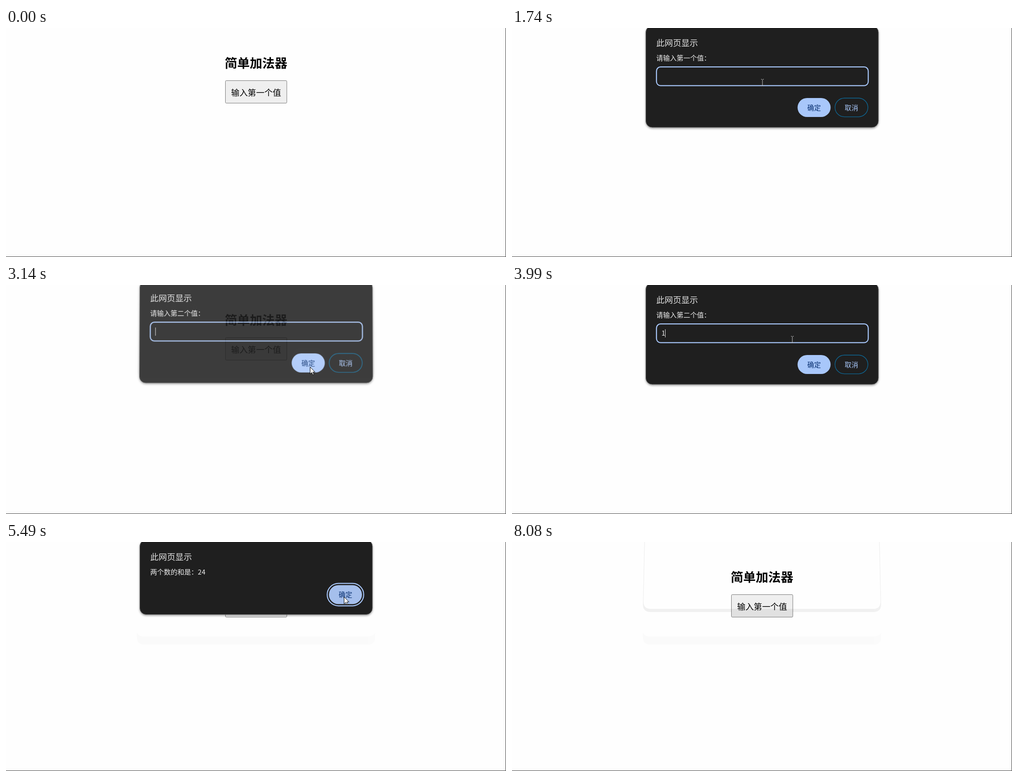
Animation of 1104x507 px, one loop 8150 ms. Source, as an HTML page:

```html
<!DOCTYPE html>
<html lang="zh-CN">
<head>
<meta charset="utf-8">
<title>简单加法器</title>
<style>
html, body { margin: 0; width: 100%; height: 100%; overflow: hidden; background: #fefefe; }
#stage { position: relative; width: 100%; height: 100%; overflow: clip; contain: strict; }
.layer { position: absolute; left: 0; top: 0; width: 100%; height: 100%; overflow: hidden; }
svg { display: block; width: 1104px; height: 507px; }
text { font-family: "Noto Sans CJK SC", "Noto Sans CJK JP", "Noto Sans CJK", sans-serif; font-size: 15px; }

/* every animation shares one 8150 ms cycle */
.dialog, .anim { animation: 8150ms linear infinite; }
.step { animation: 8150ms step-end infinite; }

.title { font-size: 27.6px; font-weight: 700; }
.label { font-size: 18.4px; }
.head { font-size: 18.4px; fill: #e3e3e3; }
.body { fill: #eee; }
.panel { fill: #1f1f1f; stroke: #6a6a6a; filter: drop-shadow(0 2px 2px rgba(0, 0, 0, .4)); }
.ok { fill: #a8c7fa; }
.oktext { fill: #062e6f; }
.cancel { fill: none; stroke: #0d6795; stroke-width: 1.4; }
.canceltext { fill: #a8c7fa; }
.field { fill: none; stroke: #a8c7fa; stroke-width: 2.3; }
.caret { fill: #e3e3e3; }
.dialog { height: 240px; transform-origin: 552px 0; opacity: 0; }
.dialog svg { height: 240px; }

#button { animation-name: hover; }
@keyframes hover {
  0% { fill: #efefef; }
  8.589% { fill: #e5e5e5; }
  14.356%, 100% { fill: #efefef; }
}

#first { animation-name: first; }
@keyframes first {
  0%, 11.534% { opacity: 0; transform: perspective(1000px) translateY(-14px) rotateX(1.2deg); animation-timing-function: ease-out; }
  14.356%, 37.546% { opacity: 1; transform: perspective(1000px) translateY(0) rotateX(0deg); }
  38.037% { opacity: .85; transform: perspective(1000px) translateY(-10.7px) rotateX(3deg); }
  38.57%, 100% { opacity: 0; transform: perspective(1000px) translateY(-18px) rotateX(5deg); }
}
#second { animation-name: second; }
@keyframes second {
  0%, 37.669% { opacity: 0; transform: perspective(1000px) translateY(-14px) rotateX(1.2deg); }
  38.528% { opacity: .865; transform: perspective(1000px) translateY(-4px) rotateX(1deg); }
  39.264%, 56.933% { opacity: 1; transform: perspective(1000px) translateY(0) rotateX(0deg); }
  57.546% { opacity: .92; transform: perspective(1000px) translateY(-10.7px) rotateX(3deg); }
  58.405%, 100% { opacity: 0; transform: perspective(1000px) translateY(-18px) rotateX(5deg); }
}
#sum { animation-name: sum; }
@keyframes sum {
  0%, 57.301% { opacity: 0; transform: perspective(1000px) translateY(-14px) rotateX(0deg); }
  57.546% { opacity: .19; transform: perspective(1000px) translateY(-12.5px) rotateX(0deg); animation-timing-function: ease-out; }
  59.141%, 75.46% { opacity: 1; transform: perspective(1000px) translateY(0) rotateX(0deg); }
  76.074% { opacity: .85; transform: perspective(1000px) translateY(-6px) rotateX(4deg); }
  76.56%, 100% { opacity: 0; transform: perspective(1000px) translateY(-10px) rotateX(8deg); }
}

#first .field { animation-name: blur1; }
@keyframes blur1 { 37.546%, 100% { stroke: #7c7e80; stroke-width: 1.2px; } }
#second .field { animation-name: blur2; }
@keyframes blur2 { 56.933%, 100% { stroke: #7c7e80; stroke-width: 1.2px; } }

/* typed digits */
.digit { fill-opacity: 0; }
#first .one { animation-name: type1; }
#first .two { animation-name: type2; }
#second .one { animation-name: type3; }
#second .two { animation-name: type4; }
@keyframes type1 { 25.153%, 100% { fill-opacity: 1; } }
@keyframes type2 { 26.994%, 100% { fill-opacity: 1; } }
@keyframes type3 { 48.957%, 100% { fill-opacity: 1; } }
@keyframes type4 { 50.552%, 100% { fill-opacity: 1; } }

#first .caret { animation-name: caret1; }
@keyframes caret1 {
  0% { opacity: 1; transform: translateX(0); }
  18.405% { opacity: 0; transform: translateX(0); }
  24.54% { opacity: 1; transform: translateX(0); }
  25.153% { opacity: 1; transform: translateX(8px); }
  26.994% { opacity: 1; transform: translateX(17px); }
  33.129%, 100% { opacity: 0; transform: translateX(17px); }
}
#second .caret { animation-name: caret2; }
@keyframes caret2 {
  0% { opacity: 1; transform: translateX(0); }
  43.558% { opacity: 0; transform: translateX(0); }
  48.957% { opacity: 1; transform: translateX(8px); }
  50.552% { opacity: 1; transform: translateX(17px); }
  56.687%, 100% { opacity: 0; transform: translateX(17px); }
}

#sum .ok { animation-name: okhover; }
@keyframes okhover { 66%, 100% { fill: #a5bfec; } }

/* faint marks left behind by closed dialogs */
.ghost { opacity: 0; fill-rule: evenodd; }
.low { animation-name: low; }
@keyframes low { 59.141%, 100% { opacity: .012; } }
.flash { animation-name: flash; }
@keyframes flash { 76.442% { opacity: .051; } 77.301%, 100% { opacity: 0; } }
.rim { animation-name: rim; }
@keyframes rim { 77.301%, 100% { opacity: .051; } }

#pointer { animation-name: travel; animation-timing-function: ease-in-out; }
@keyframes travel {
  0%, 3.313% { transform: translate(575px, 421px); }
  9.571%, 17.791% { transform: translate(553px, 152px); }
  19.632%, 28.834% { transform: translate(553px, 120px); }
  33.374%, 40.491% { transform: translate(671px, 181px); }
  43.558%, 51.534% { transform: translate(619px, 120px); }
  54.601%, 62.822% { transform: translate(680px, 184px); }
  67.362%, 77.914% { transform: translate(746px, 121px); }
  84.908%, 85.521% { transform: translate(958px, 489px); }
  87.607%, 100% { transform: translate(968px, 508px); }
}
#pointer path { opacity: 0; }
.arrow { animation-name: arrow; }
@keyframes arrow {
  3.313% { opacity: 1; }
  19.018% { opacity: 0; }
  29.448% { opacity: 1; }
  31.656% { opacity: 0; }
  37.546% { opacity: 1; }
  42.577% { opacity: 0; }
  52.025% { opacity: 1; }
  53.374% { opacity: 0; }
  62.822% { opacity: 1; }
  87.607%, 100% { opacity: 0; }
}
.beam { animation-name: beam; }
@keyframes beam {
  19.018% { opacity: 1; }
  29.448% { opacity: 0; }
  42.577% { opacity: 1; }
  52.025%, 100% { opacity: 0; }
}
.hand { animation-name: hand; }
@keyframes hand {
  31.656% { opacity: 1; }
  37.546% { opacity: 0; }
  53.374% { opacity: 1; }
  62.822%, 100% { opacity: 0; }
}
</style>
</head>
<body>
<div id="stage">
  <div class="layer">
    <svg>
      <defs>
        <g id="prompt">
          <rect class="panel" x="295.5" y="-4.5" width="513.5" height="224.5" rx="14"/>
          <text class="head" x="318.6" y="40">此网页显示</text>
          <rect class="ok" x="630.5" y="155" width="73" height="42" rx="21"/>
          <text class="oktext" x="652" y="181.6">确定</text>
          <rect class="cancel" x="713.2" y="155.2" width="72.6" height="41.4" rx="20.7"/>
          <text class="canceltext" x="734.5" y="181.6">取消</text>
        </g>
      </defs>
      <text class="title" x="483" y="88.4">简单加法器</text>
      <rect id="button" class="step" x="484.5" y="116.5" width="135.5" height="49.8" rx="2" fill="#efefef" stroke="#767676"/>
      <text class="label" x="497" y="149.6">输入第一个值</text>
      <path d="M1103.5 0V506.5H0" fill="none" stroke="#3c3c3c"/>
      <path class="ghost step low" d="M289 197Q289 209 305 209H799Q815 209 815 197V211Q815 227 799 227H305Q289 227 289 211Z"/>
      <path class="ghost step flash" d="M292 0L289 138Q289 155 306 155H798Q815 155 815 138L812 0ZM485 155H620V166H485Z"/>
      <path class="ghost step rim" d="M292 0L289 138Q289 155 306 155H798Q815 155 815 138L812 0ZM293.5 0L290.5 133Q291 148 306 148H798Q813 148 813.5 133L810.5 0ZM485 155H620V166H485Z"/>
    </svg>
  </div>

  <div id="first" class="layer dialog">
    <svg>
      <use href="#prompt"/>
      <text class="body" x="318.6" y="71.8">请输入第一个值：</text>
      <rect class="field step" x="319" y="86.2" width="467.6" height="41.4" rx="9"/>
      <text class="body" x="330" y="112.3"><tspan class="digit step one">1</tspan><tspan class="digit step two">2</tspan></text>
      <rect class="caret step" x="330" y="98" width="1" height="18"/>
    </svg>
  </div>

  <div id="second" class="layer dialog">
    <svg>
      <use href="#prompt"/>
      <text class="body" x="318.6" y="71.8">请输入第二个值：</text>
      <rect class="field step" x="319" y="86.2" width="467.6" height="41.4" rx="9"/>
      <text class="body" x="330" y="112.3"><tspan class="digit step one">1</tspan><tspan class="digit step two">2</tspan></text>
      <rect class="caret step" x="330" y="98" width="1" height="18"/>
    </svg>
  </div>

  <div id="sum" class="layer dialog">
    <svg>
      <rect class="panel" x="295.5" y="-4.5" width="513.5" height="165" rx="14"/>
      <text class="head" x="318.6" y="40">此网页显示</text>
      <text class="body" x="318.6" y="71.8">两个数的和是：24</text>
      <rect x="709.2" y="91.7" width="80.6" height="49.6" rx="24.8" fill="none" stroke="#a8c7fa" stroke-width="2.2"/>
      <rect class="ok step" x="713" y="95.5" width="73" height="42" rx="21"/>
      <text class="oktext" x="734.5" y="121.8">确定</text>
    </svg>
  </div>

  <div class="layer">
    <svg>
      <g id="pointer" class="anim">
        <path class="arrow step" d="M.5.5V16L4.1 12.7 6.4 17.9 8.7 16.9 6.5 11.8H11.3Z" fill="#fff" stroke="#000"/>
        <path class="beam step" d="M-3-6.5H-1M1-6.5H3M0-6V7M-3 7.5H-1M1 7.5H3" fill="none" stroke="#c8c8c8"/>
        <path class="hand step" d="M-2 12V1.5a1.7 1.7 0 0 1 3.4 0V8q2.4-.8 2.7.8 1.9-.6 2.2.9 1.7 0 1.7 1.8V15q0 2.6-1.5 4.5V21H-1V19.5L-5.5 13q-.6-2.2 1.2-2Z" fill="#fff" stroke="#000"/>
      </g>
    </svg>
  </div>
</div>
</body>
</html>
```
